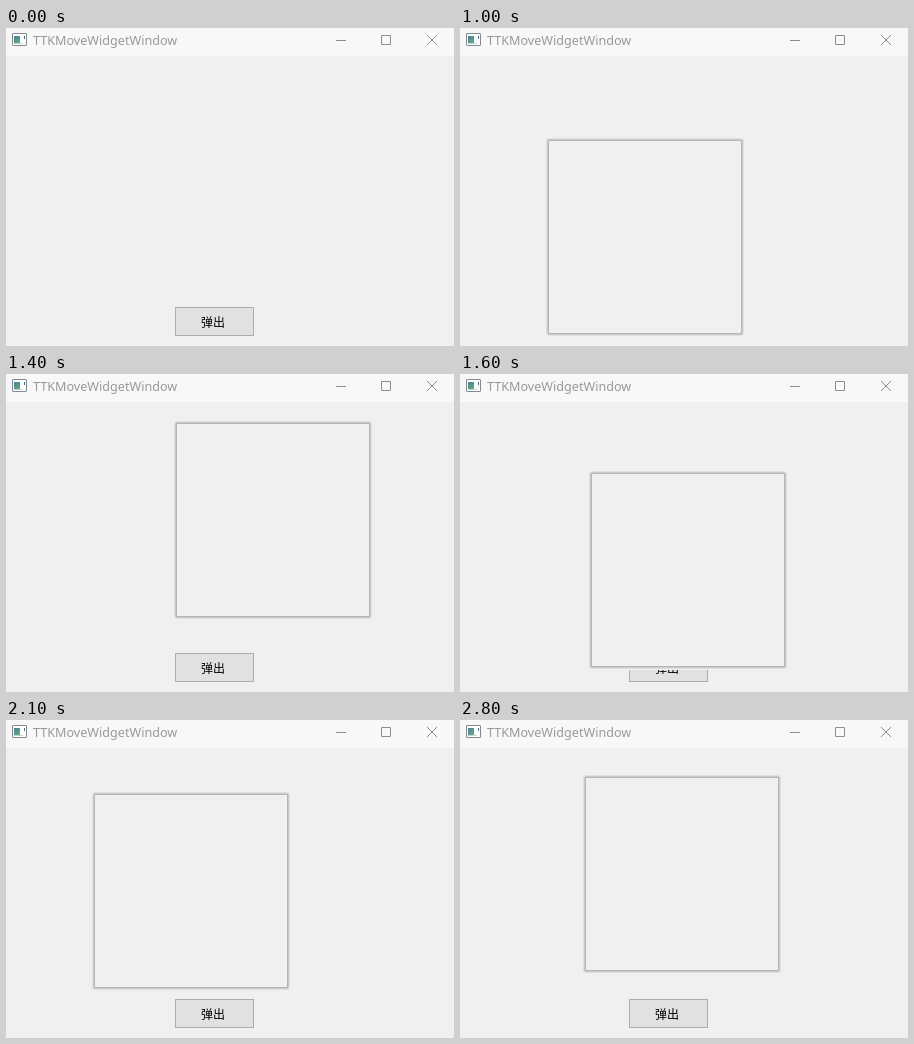
Write an HTML page that moves like this. It is 448 px wide and 318 px high and loops after 3400 ms.

```html
<!DOCTYPE html>
<html lang="zh">
<head>
<meta charset="utf-8">
<title>TTKMoveWidgetWindow</title>
<style>
  html, body { margin: 0; height: 100%; overflow: hidden; background: #f0f0f0; }
  svg { display: block; }
  text { white-space: pre; }
  #title { font: 12.6px "Noto Sans", "Open Sans", sans-serif; }
  #label { font: 500 12px "Noto Sans CJK SC", "Noto Sans CJK", sans-serif; text-anchor: middle; }
</style>
</head>
<body>
<svg width="448" height="318" viewBox="0 0 448 318">
  <defs>
    <linearGradient id="screen" x2="0.6" y2="1">
      <stop offset="0" stop-color="#4a7fa0"/>
      <stop offset="1" stop-color="#5fa77c"/>
    </linearGradient>
  </defs>
  <rect width="448" height="318" fill="#f0f0f0"/>
  <rect width="448" height="28" fill="#f8f8f8"/>

  <g id="icon">
    <rect x="6.5" y="5.5" width="14" height="12" rx="0.5" fill="#fff" stroke="#7f8b91"/>
    <rect x="8" y="8" width="6" height="7" fill="url(#screen)"/>
    <path d="M8 15.5h9" stroke="#c3d0d4"/>
    <rect x="18" y="8" width="1" height="3" fill="#4d6b85"/>
  </g>

  <text id="title" x="27" y="17">TTKMoveWidgetWindow</text>
  <g id="controls" fill="none">
    <path d="M330 12.5h10M375.5 7.5h9v9h-9z"/>
    <path d="M421 7l10 10M431 7l-10 10"/>
  </g>

  <rect id="button" x="169.5" y="279.5" width="78" height="28"/>
  <text id="label" x="207" y="298.5">弹出</text>

  <g id="popup" fill="none">
    <rect width="200" height="200" fill="#f0f0f0"/>
    <rect x="1.5" y="1.5" width="197" height="197" rx="2" stroke="#e0e0e0"/>
    <rect x="2.5" y="2.5" width="195" height="195" rx="1" stroke="#cacaca"/>
    <rect x="3.5" y="3.5" width="193" height="193" stroke="#b5b5b5"/>
  </g>
</svg>
<script>
const LOOP = 3400, STEP = 100;
const SHOW = 6, DRAG = 9;
const $ = id => document.getElementById(id);

// Popup corner at each step of the drag, three clockwise swings
const path = [
  [124, 75], [85, 109], [6, 98], [11, 72], [60, 28], [167, 46], [162, 86],
  [128, 96], [98, 76], [140, 50], [216, 68], [160, 101], [85, 71],
  [104, 39], [174, 48], [150, 79], [99, 80], [84, 62], [120, 54], [122, 54]
];

// Button [fill, border]
const normal = ['#e1e1e1', '#adadad'];
const hover = ['#e5f1fb', '#0078d7'];
const pressed = ['#cce4f7', '#005499'];
const buttonStates = {
  2: ['#e3e9ee', '#5793c2'],
  3: hover,
  4: pressed,
  5: pressed,
  6: ['#d3e4f3', '#3c6384'],
  7: ['#dbe2e9', '#7b909f']
};

function draw(now) {
  const step = Math.floor(now % LOOP / STEP);

  const active = step === 4 || step === 5;
  $('title').setAttribute('fill', active ? '#000' : '#999');
  $('controls').setAttribute('stroke', active ? '#000' : '#8e8e8e');

  const [fill, border] = buttonStates[step] || normal;
  $('button').setAttribute('fill', fill);
  $('button').setAttribute('stroke', border);

  const [x, y] = path[Math.min(Math.max(step - DRAG, 0), path.length - 1)];
  $('popup').setAttribute('transform', `translate(${x} ${y})`);
  $('popup').setAttribute('visibility', step < SHOW ? 'hidden' : 'visible');
}

const start = performance.now();
function tick() {
  draw(performance.now() - start);
  requestAnimationFrame(tick);
}
tick();
</script>
</body>
</html>
```
